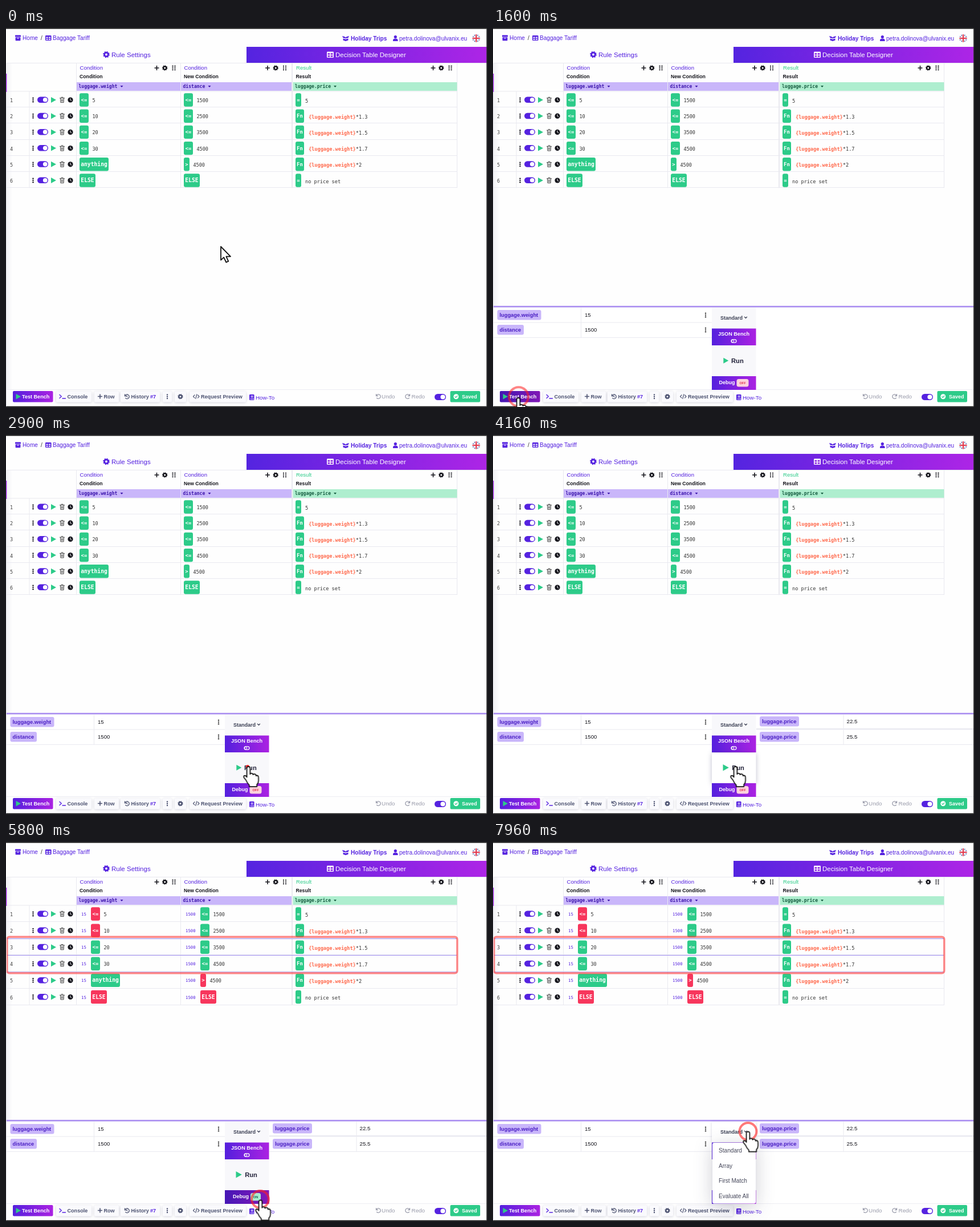
An HTML page for the animation above (8000 ms loop, 844 px wide and 664 px high).

```html
<!DOCTYPE html>
<html lang="en">
<head>
<meta charset="utf-8">
<title>Decision table</title>
<style>
html, body { margin: 0; width: 100%; height: 100%; overflow: hidden; background: #fff; }
svg { display: block; font-family: "Liberation Sans", Arial, sans-serif; }
text { white-space: pre; }
.b { font-weight: 700; }
.m { font-family: "DejaVu Sans Mono", monospace; }
.soft { filter: drop-shadow(0 1px 2px rgba(40, 40, 90, .2)); }
.lift { filter: drop-shadow(0 1px 4px rgba(40, 40, 90, .3)); }
.menu { filter: drop-shadow(0 6px 16px rgba(30, 30, 60, .22)); }
#cursor { animation: move 8s cubic-bezier(.333, 0, .667, 1) infinite; }
#mark { animation: mark 8s linear infinite; }
@keyframes move {
  0%, 2.5% { transform: translate(377px, 383px); }
  12%, 24.5% { transform: translate(44px, 648px); }
  34.125%, 57% { transform: translate(425px, 581px); }
  64.125%, 82.25% { transform: translate(446px, 627.5px); }
  91.25%, 100% { transform: translate(447px, 507.5px); }
}
@keyframes mark {
  0%, 67.8% { opacity: 0; }
  71%, 100% { opacity: .6; }
}
</style>
</head>
<body>
<svg id="stage" width="844" height="664" viewBox="0 0 844 664"></svg>
<script>
const VIOLET = '#5522e0', GREEN = '#2dcb89', RED = '#f7365c', INK = '#15151c', SLATE = '#4c5270',
      LILAC = '#c9b6fa', LINE = '#e9e9f0', GREY = '#9a9cab';

// Drawing helpers
const text = (x, y, s, size, fill = INK, cls = '') =>
  `<text x="${x}" y="${y}" font-size="${size}" fill="${fill}" class="${cls}">${s.replace(/</g, '&lt;')}</text>`;
const rect = (x, y, w, h, fill, r = 0, more = '') =>
  `<rect x="${x}" y="${y}" width="${w}" height="${h}" rx="${r}" fill="${fill}" ${more}/>`;
const dot = (x, y, r, fill) => `<circle cx="${x}" cy="${y}" r="${r}" fill="${fill}"/>`;
const stroke = (d, c, w = 1.4) =>
  `<path d="${d}" fill="none" stroke="${c}" stroke-width="${w}" stroke-linecap="round" stroke-linejoin="round"/>`;
const fillPath = (d, c) => `<path d="${d}" fill="${c}"/>`;
const hline = (x, y, w, c = LINE, h = 1) => rect(x, y, w, h, c);
const vline = (x, y, h, c = LINE, w = 1) => rect(x, y, w, h, c);
const group = (id, ...parts) => `<g id="${id}">${parts.join('')}</g>`;

// Icons
const play = (x, y, s = 1) => fillPath(`M${x} ${y - 5 * s}L${x + 9 * s} ${y}L${x} ${y + 5 * s}Z`, GREEN);
const dots = (x, y, c = INK, gap = 3.3) => [-1, 0, 1].map(k => dot(x, y + k * gap, 1.2, c)).join('');
const grip = (x, y) => [-2, 2].map(dx => [-3.2, 0, 3.2].map(dy => rect(x + dx - 1, y + dy - 1, 2, 2, INK, .4)).join('')).join('');
const plus = (x, y, c = INK, r = 3.4) => stroke(`M${x - r} ${y}h${2 * r}M${x} ${y - r}v${2 * r}`, c, 1.6);
const gear = (x, y, r, c) =>
  `<g fill="none" stroke="${c}"><circle cx="${x}" cy="${y}" r="${r * .58}" stroke-width="${r * .5}"/>` +
  `<circle cx="${x}" cy="${y}" r="${r * .86}" stroke-width="${r * .3}" stroke-dasharray="${r * .338}"/></g>`;
const grid = (x, y, w, h, c) => {
  const cw = (w - 4.4) / 2, ch = (h - 5.2) / 2;
  const cells = [0, 1].map(i => [0, 1].map(j =>
    rect(x + 1.5 + i * (cw + 1.4), y + 2.6 + j * (ch + 1.3), cw, ch, c === '#fff' ? '#8a25e2' : '#fff')).join(''));
  return rect(x, y, w, h, c, 1.3) + cells.join('');
};
const toggle = (x, y, w = 19, h = 10.5) =>
  rect(x, y, w, h, VIOLET, h / 2) + dot(x + w - h / 2, y + h / 2, h / 2 - 1.4, '#fff');
const trash = (x, y) => stroke(`M${x - 4} ${y - 3.2}h8M${x - 1.5} ${y - 4.7}h3M${x - 3} ${y - 3}l.4 7.5h5.2l.4 -7.5M${x - 1} ${y - 1}v3.6M${x + 1} ${y - 1}v3.6`, '#333', .9);
const clock = (x, y) => dot(x, y, 4.6, INK) + stroke(`M${x} ${y - 2.4}v2.6l1.8 1.2`, '#fff', 1);
const turn = (x, y, c, flip = 1) =>
  `<g transform="translate(${x} ${y}) scale(${flip} 1)">${stroke('M-3.5 -3.8v3h3M-3.2 -1.2A3.8 3.8 0 1 1 -2.4 2.7', c, 1.3)}</g>`;
const chevron = (x, y, c) => stroke(`M${x - 2} ${y - 1}l2 2 2 -2`, c, 1.3);
const caret = (x, y, c) => fillPath(`M${x - 2.5} ${y - 1.5}h5l-2.5 3z`, c);

// Table
const badge = (x, y, s, ok = true) => {
  const w = { '<=': 16, '>': 10, '=': 10, Fn: 15, ELSE: 28, anything: 51 }[s];
  const size = s === 'anything' || s === 'ELSE' ? 9.7 : 9;
  return rect(x, y - 11.7, w, 23.4, ok ? GREEN : RED, 3) +
    `<text x="${x + w / 2}" y="${y + 3}" text-anchor="middle" font-size="${size}" fill="#fff" class="m b">${s.replace('<', '&lt;')}</text>`;
};

const rows = [
  ['<=', '5', '<=', '1500', '=', '5'],
  ['<=', '10', '<=', '2500', 'Fn', '*1.3'],
  ['<=', '20', '<=', '3500', 'Fn', '*1.5'],
  ['<=', '30', '<=', '4500', 'Fn', '*1.7'],
  ['anything', '', '>', '4500', 'Fn', '*2'],
  ['ELSE', '', 'ELSE', '', '=', 'no price set']
];

function table(debug) {
  const step = debug ? 29.1 : 28.2, end = 111 + 6 * step;
  let out = [[40.5], [123], [306], [501, 2], [791]].map(([x, w]) => vline(x, 111, end - 111, LINE, w)).join('');
  rows.forEach(([op1, v1, op2, v2, op3, v3], i) => {
    const y = 126 + i * step, base = y + 4;
    const dx1 = debug ? 20 : 0, dx2 = debug ? 29 : 0;
    out += hline(1, Math.round(111 + (i + 1) * step) - 1, 791);
    out += text(7, base, String(i + 1), 8.5, '#444', 'm') + dots(47.5, y, INK, 3.2) + toggle(55, y - 5.5) +
      play(79, y) + trash(98.5, y) + clock(113, y);
    if (debug) out += text(132, y + 3, '15', 7.3, VIOLET, 'm') + text(315, y + 3, '1500', 7.3, VIOLET, 'm');
    out += badge(129 + dx1, y, op1, !debug || (i > 1 && i < 5)) + text(151.5 + dx1, base, v1, 8.5, '#333', 'm');
    out += badge(312 + dx2, y, op2, !debug || i < 4) + text((op2 === '>' ? 328.5 : 334.5) + dx2, base, v2, 8.5, '#333', 'm');
    out += badge(508, y, op3);
    out += op3 === 'Fn'
      ? `<text x="531" y="${base + .5}" font-size="8.6" class="m"><tspan fill="#ff6a4d" class="b">{luggage.weight}</tspan><tspan fill="#333">${v3}</tspan></text>`
      : text(525, base + .5, v3, 8.6, '#333', 'm');
  });
  if (debug) out += [169, 198, 227.5].map(y => hline(2, y, 789, '#a08ff0')).join('');
  return out;
}

const column = (x, w, kind, name, field, band, ink, caretX) =>
  text(x, 73, kind, 9.6, ink) + text(x - .5, 88, name, 8.7, INK, 'b') +
  rect(x - 5.5, 95, w, 15, band) + text(x - 2, 105.3, field, 8.05, ink === GREEN ? '#155c40' : '#3d16ad', 'm b') +
  caret(caretX, 102.5, ink === GREEN ? '#155c40' : '#3d16ad');
const tools = x => plus(x, 70) + gear(x + 14.2, 70, 4.6, INK) + grip(x + 30, 70);

const header = [
  rect(16, 12.5, 10, 3, VIOLET, .6) + rect(16.6, 16.2, 8.8, 6, VIOLET, .8) + hline(19.2, 17.5, 3.6, '#fff'),
  text(29, 21, 'Home', 10.1, VIOLET), text(61, 21, '/', 10.1, '#333'),
  grid(69, 13, 10.5, 9, VIOLET), text(82, 21, 'Baggage Tariff', 10.1, VIOLET),
  fillPath('M590 14l5 1.5 1 1.5 1 -1.5 5 -1.5 -1.5 3.2 -4.5 1 -4.5 -1zM591.5 18.5l4.5 1.2 4.5 -1.2v3l-4.5 1.5 -4.5 -1.5z', VIOLET),
  text(605, 22, 'Holiday Trips', 10.1, VIOLET, 'b'),
  dot(683.3, 15.5, 2.6, VIOLET), fillPath('M679 23v-1.5q0 -3 4.3 -3t4.3 3v1.5z', VIOLET),
  text(690, 22, 'petra.dolinova@ulvanix.eu', 10.1, VIOLET),
  dot(825, 18, 6.7, '#4a5fa8'),
  stroke('M820.5 13.5l9 9M829.5 13.5l-9 9', '#fff', 2), stroke('M825 12.2v11.6M819.2 18h11.6', '#fff', 4),
  stroke('M825 12.2v11.6M819.2 18h11.6', '#e0384c', 2.2),
  gear(176, 46.5, 5.8, VIOLET), text(185, 51, 'Rule Settings', 11.55, VIOLET),
  rect(422, 33, 421, 28, 'url(#tab)'), grid(563, 41.5, 12, 10.5, '#fff'),
  text(578, 51, 'Decision Table Designer', 11.5, '#fff'),
  hline(1, 61, 842), vline(123, 62, 49), vline(306, 62, 49), vline(501, 62, 49, LINE, 2), vline(791, 62, 49),
  column(129.5, 182, 'Condition', 'Condition', 'luggage.weight', LILAC, VIOLET, 203), tools(264.5),
  column(312.5, 194, 'Condition', 'New Condition', 'distance', LILAC, VIOLET, 357), tools(459),
  column(509, 288, 'Result', 'Result', 'luggage.price', '#aeeecf', GREEN, 577.5), tools(749.5),
  hline(1, 110.5, 791), vline(0, 80, 32, '#a026e6', 1.3)
];

// Bottom bar
const button = (x, w) => rect(x, 636.5, w, 19, '#fafafd', 2, 'class="soft"');
const bar = [
  hline(1, 633, 842, '#ededf3'),
  rect(12, 636, 70.5, 19.5, 'url(#grad)', 2), group('benchHover', rect(12, 636, 70.5, 19.5, '#200050', 2, 'fill-opacity=".3"')),
  play(17.5, 645.7, .95), text(28, 648.7, 'Test Bench', 9.1, '#fff', 'b'),
  button(88, 62), stroke('M94 642.5l3.3 3 -3.3 3M99 649h5.5', VIOLET, 1.4), text(107.5, 648.7, 'Console', 9.1, SLATE, 'b'),
  button(155, 43), plus(165, 645.5, SLATE), text(171.5, 648.7, 'Row', 9.1, SLATE, 'b'),
  button(201, 69), turn(212, 645.7, SLATE), stroke('M212 643.8v2.2l1.4 .8', SLATE, 1),
  text(219.5, 648.7, 'History', 9.1, SLATE, 'b'), text(253, 648.7, '#7', 9.1, VIOLET, 'b'),
  button(275, 16), dots(283, 645.7, SLATE), button(296, 20), gear(306, 645.7, 4.6, SLATE),
  button(322, 99), stroke('M331 643l-2.5 2.6 2.5 2.6M336.5 643l2.5 2.6 -2.5 2.6M334.7 641.8l-1.8 7.6', SLATE, 1.2),
  text(342, 648.7, 'Request Preview', 9.1, SLATE, 'b'),
  rect(427, 642, 8.5, 10, VIOLET, 1.3), hline(429.5, 644.2, 4.2, '#fff'), hline(429.5, 646.2, 4.2, '#fff'), hline(428.5, 649.5, 6.5, '#fff'),
  text(438, 650.5, 'How-To', 9.8, VIOLET),
  turn(653, 645.5, GREY), text(659, 649, 'Undo', 9.9, GREY),
  turn(705, 645.5, GREY, -1), text(711.5, 649, 'Redo', 9.9, GREY),
  toggle(752, 641, 20, 11),
  rect(779.5, 636, 52.5, 19.5, GREEN, 2), dot(789.8, 645.7, 4.5, '#fff'), stroke('M787.8 645.8l1.5 1.5 2.6 -3', GREEN, 1.2),
  text(800, 648.7, 'Saved', 9, '#fff', 'b')
];

// Test bench panel
const pill = (x, y, w, s) => rect(x, y, w, 17.5, LILAC, 3) + text(x + 4, y + 12, s, 9.3, '#4a1fc4', 'b');
const runFace = (x, textX, size) => play(x, 582.7, size) + text(textX, 586.5, 'Run', 11.2, '#23233a', 'b');
const debugFace = (x, s, fill, ink) =>
  text(x, 624, 'Debug', 9, '#fff', 'b') +
  rect(s === 'ON' ? 429 : 427.5, 615, s === 'ON' ? 18 : 21, 13.5, fill, 3.5) +
  text(s === 'ON' ? 434 : 432.5, 623.6, s, 5.6, ink, 'b');

const bench = [
  rect(1, 490, 842, 143, '#fff'), hline(1, 486.8, 842, '#a98df0', 2.6),
  hline(1, 515.5, 383), hline(1, 541.8, 383), vline(154, 490, 52),
  pill(7.5, 494, 77, 'luggage.weight'), text(161, 506, '15', 9.6), dots(373, 503, '#444'),
  pill(7.5, 520, 46.5, 'distance'), text(161, 532, '1500', 9.6), dots(373, 529, '#444'),
  rect(384, 490, 77.5, 144, '#f8f8fb'),
  group('stdHover', rect(384, 490, 77.5, 36, '#fff', 0, 'class="soft"')),
  text(399, 510.5, 'Standard', 9, '#3c4054', 'b'), chevron(443.5, 507.3, '#3c4054'),
  rect(384, 526.5, 77.5, 29.5, 'url(#grad)'),
  text(395, 539, 'JSON Bench', 9.1, '#fff', 'b'),
  '<rect x="418" y="545.8" width="9" height="5.4" rx="2.7" fill="none" stroke="#fff" stroke-width="1.2"/><circle cx="420.6" cy="548.5" r="2" fill="none" stroke="#fff"/>',
  group('runHover', rect(384, 557, 77.5, 53, '#fff', 0, 'class="lift"')),
  group('runBefore', runFace(404.3, 418, 1)), group('runAfter', runFace(403.5, 419.2, 1.15)),
  rect(384, 610, 77.5, 24, 'url(#grad)'), group('debugHover', rect(384, 610, 77.5, 24, '#200050', 0, 'fill-opacity=".28"')),
  group('off', debugFace(396.5, 'OFF', '#ffd3dc', '#e0304f')), group('on', debugFace(398, 'ON', '#a9ecd0', '#14604a'))
];

const results = [[493, '22.5', 514.2], [520, '25.5', 541.8]].map(([y, v, ly]) =>
  pill(468, y, 69, 'luggage.price') + text(620.5, y + 12, v, 9.7) + hline(462, ly, 381, '#e6e6ee', ly < 520 ? 2 : 1)).join('') +
  vline(614.5, 490, 52);

const menu = rect(385, 527, 76, 106.5, '#fff', 3, 'class="menu"') +
  ['Standard', 'Array', 'First Match', 'Evaluate All'].map((s, i) => text(396, 544 + i * 26.7, s, 10.1, '#45475a')).join('');

const arrow = 'M0 0V23.5L5.2 18.8L9.3 27.5L13.2 25.6L9.4 17.3H17Z';
const hand = 'M-2.5 3Q-2.5 0 .5 0Q3.5 0 3.5 3V14Q4 11.5 7 12.5Q9 13 9 15Q10 13 13 14Q14.5 15 14.5 17Q16.5 15.5 18.5 17.5Q19 18.5 19 21V26Q19 30 16 33V37H2V34Q-2 30 -4 25L-8 20Q-9 17 -6.5 16.5Q-4 16.5 -2.5 19.5Z';
const pointer = (d, scale = 1) =>
  `<path d="${d}" transform="scale(${scale})" fill="#fff" stroke="#111" stroke-width="1.8" stroke-linejoin="round"/>`;

const clicks = [[45, 646, 1030], [424, 581, 2900], [446, 626, 5300], [447.5, 507, 7460]];
const rings = clicks.map(([x, y, t]) =>
  `<circle id="ring${t}" cx="${x}" cy="${y}" r="0" opacity="0" fill="none" stroke="#ff2020" stroke-width="4"/>`);

const gradient = (id, a, b) => `<linearGradient id="${id}"><stop stop-color="${a}"/><stop offset="1" stop-color="${b}"/></linearGradient>`;

document.getElementById('stage').innerHTML = [
  '<defs>', gradient('tab', '#5424e0', '#ad25e6'), gradient('grad', '#5420dd', '#ab22e2'), gradient('edge', '#ececf0', '#fff'), '</defs>',
  rect(0, 0, 844, 664, '#fefefe'), rect(0, 62, 12, 571, 'url(#edge)', 0, 'opacity=".7"'),
  ...header, group('plain', table(false)), group('debug', table(true)),
  rect(1.8, 166.3, 790, 63.4, 'none', 4, 'id="mark" stroke="#ff3838" stroke-width="3.4"'),
  ...bar, group('bench', ...bench, group('results', results)), group('menu', menu),
  hline(0, 0, 844, '#141414', 1.5), hline(0, 662.7, 844, '#141414', 1.3), vline(843, 0, 664, '#333'), vline(0, 112, 551, '#dcdce2'),
  ...rings, group('cursor', group('arrow', pointer(arrow)), group('hand', pointer(hand, .95)))
].join('');

// Visibility switches: times alternate between on and off, in ms
const switches = {
  plain: [0, 5430], debug: [5430], off: [0, 5430], on: [5430],
  bench: [1150], results: [3150], menu: [7580],
  benchHover: [900, 2110], runHover: [2960, 4890, 6770, 6990], debugHover: [4890, 6770],
  stdHover: [7120],
  runBefore: [0, 3150], runAfter: [3150],
  arrow: [0, 862, 2150, 2570], hand: [862, 2150, 2570]
};
let css = '';
for (const [id, times] of Object.entries(switches)) {
  const steps = times.map((t, i) => `${t / 80}%{opacity:${i % 2 ? 0 : 1}}`).join('');
  css += `@keyframes ${id}{0%{opacity:0}${steps}}#${id}{animation:${id} 8s step-end infinite}`;
}

// Click rings widen and fade evenly
for (const [, , t] of clicks) {
  const end = Math.min(t + 1260, 8000), p = (end - t) / 1260;
  css += `@keyframes ring${t}{0%,${t / 80 - .01}%{r:0;opacity:0}${t / 80}%{r:1px;opacity:1}` +
    `${end / 80}%{r:${1 + 35 * p}px;opacity:${1 - p}}}#ring${t}{animation:ring${t} 8s linear infinite}`;
}
document.head.append(Object.assign(document.createElement('style'), { textContent: css }));
</script>
</body>
</html>
```
